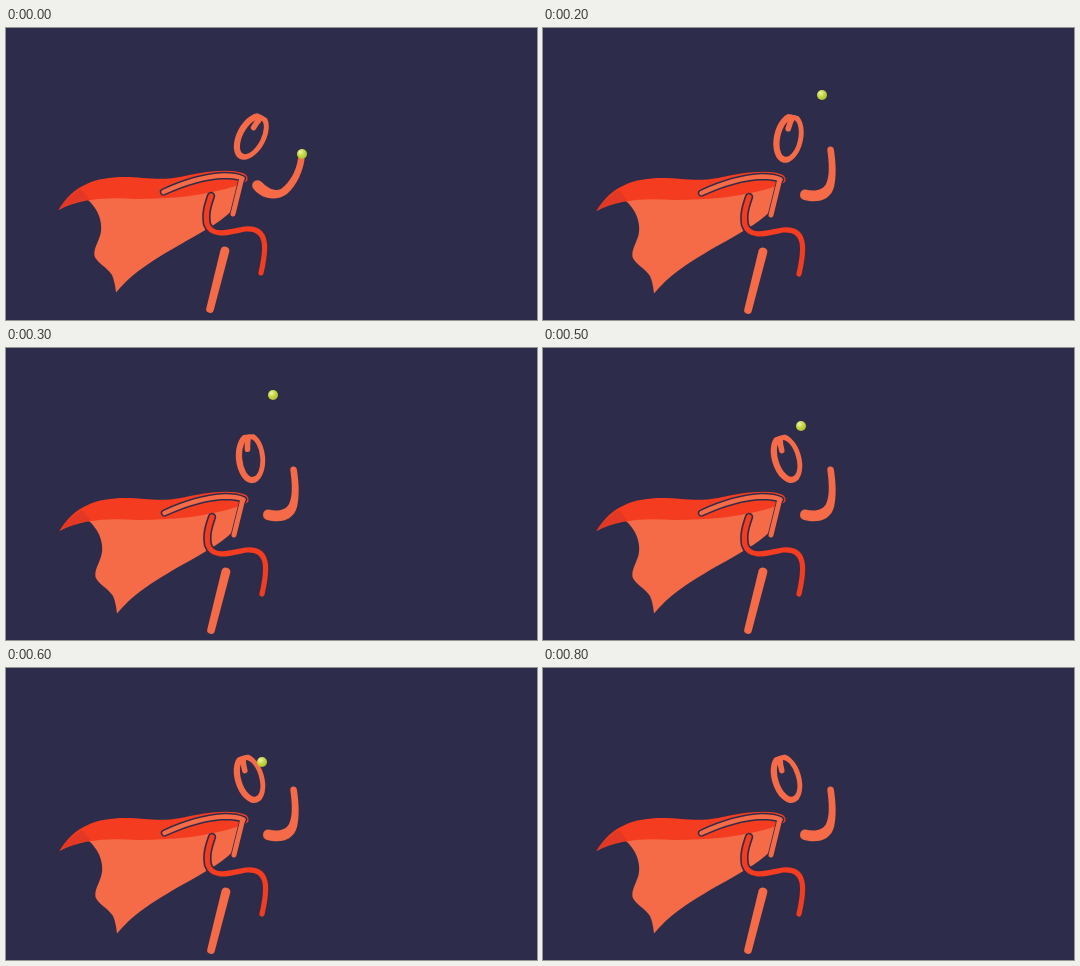
These frames come from a looping animation (531 by 292 pixels, 0.9 s). An HTML page:

```html
<!DOCTYPE html>
<html lang="en">
<head>
<meta charset="utf-8">
<title>Caped ball toss</title>
<style>
  html, body { margin: 0; width: 100%; height: 100%; overflow: hidden; background: #2d2c4a; }
  svg { display: block; width: 100%; height: 100%; }
  .line { fill: none; stroke-linecap: round; stroke-linejoin: round; }
  .skin { fill: #f56a47; }
</style>
</head>
<body>
<svg viewBox="0 0 531 292">
  <defs>
    <radialGradient id="felt" cx=".36" cy=".32" r=".75">
      <stop offset="0" stop-color="#edf2b4"/>
      <stop offset=".5" stop-color="#c5d640"/>
      <stop offset="1" stop-color="#a9bd2e"/>
    </radialGradient>
    <clipPath id="headTop"><rect x="-20" y="-23.500" width="40" height="50"/></clipPath>
    <path id="arm" d="M158.500 165C178 156 197 149.500 219 148.500Q231 148.500 237.500 151.500"/>
    <path id="leg" d="M206 169C203 178 200 186 202 197C207 212 228 204 240 202C263 200 262 220 256 246"/>
  </defs>

  <g id="body">
    <path class="skin" d="M76 162L83 173C94 183 98 196 95.500 207C92.500 217 88.500 222 89.500 229C92 236 102 240 107 248Q110 255 111 265.500C133 238 175 218.500 203 201.500Q218 192.500 227 183.500L240 152L160 156Z"/>
    <path fill="#f43c20" d="M53.500 183C68 158 91 150 119 150C139 150 153 154 175 150C199 145 223 141 239 146.500Q244 149 242 154L234 158C201 169 165 172 131 172C101 170 74 172 53.500 183Z"/>
    <path fill="#e23825" d="M53.500 183Q63 169 76 162L84 172Q66 175 53.500 183Z"/>
    <path class="line" stroke="#2d2c4a" stroke-width="6.600" d="M236.500 153L228 187"/>
    <use href="#arm" class="line" stroke="#2d2c4a" stroke-width="7.400"/>
    <use href="#arm" class="line" stroke="#f56a47" stroke-width="4.600"/>
    <path class="line" stroke="#f56a47" stroke-width="5" d="M236.500 152.500L228 187"/>
    <use href="#leg" class="line" stroke="#2d2c4a" stroke-width="8.400"/>
    <use href="#leg" class="line" stroke="#f43c20" stroke-width="5.200"/>
    <path class="skin" d="M215.600 222.500A4.500 4.500 0 0 1 224.300 224.500L208.800 283A3.800 3.800 0 0 1 201.300 281.200Z"/>
  </g>

  <path id="throwArm" class="skin" d="M292 130.500A3.300 3.300 0 0 1 298.500 131.500C297 143 291 157 281 166C270 174 256 171 248 161.500A5.300 5.300 0 0 1 255 153.500C261 159 267 164 275 161C284 154 290 144 292 130.500Z"/>
  <path id="restArm" class="skin" d="M284.300 122A3.300 3.300 0 0 1 290.800 121C293 134 293.500 149 291 159C288 171 276 176 261 172A5.400 5.400 0 0 1 262.500 161.400C272 164 280 162 283 156C287 148 286 134 284.300 122Z"/>

  <g id="head">
    <g clip-path="url(#headTop)">
      <path class="skin" fill-rule="evenodd" d="M-14.600 0a14.600 25.200 0 1 0 29.200 0a14.600 25.200 0 1 0 -29.200 0ZM-8.300 0a9 19 0 1 0 18 0a9 19 0 1 0 -18 0Z"/>
      <path class="line" stroke="#f56a47" stroke-width="5.600" d="M0 -22Q-2 -16 -2.200 -9"/>
    </g>
  </g>
  <circle id="ball" r="5" fill="url(#felt)"/>
</svg>
<script>
  const STEP = 100;
  const LOOP = 900;
  // Ball x, y; head x, y, tilt
  const restingHead = [243.5, 110.5, -17];
  const poses = [
    { ball: [296, 126], head: [245.3, 108.5, 28] },
    { ball: [290, 95], head: [246.3, 109.5, 28] },
    { ball: [279, 67], head: [245.5, 110, 12] },
    { ball: [267, 47], head: [244.5, 110, -5] },
    { ball: [260, 62], head: restingHead },
    { ball: [258, 78], head: restingHead },
    { ball: [256, 94], head: restingHead },
    { ball: [252, 111], head: restingHead },
    { ball: null, head: restingHead }
  ];

  const part = id => document.getElementById(id);
  const show = (id, visible) =>
    part(id).setAttribute("visibility", visible ? "visible" : "hidden");
  const place = (id, x, y, tilt = 0) =>
    part(id).setAttribute("transform", `translate(${x} ${y}) rotate(${tilt})`);

  function draw(time) {
    const step = Math.floor((time % LOOP) / STEP);
    const { ball, head } = poses[step];
    const throwing = step === 0;
    const shift = throwing ? -1 : 0;

    place("body", shift, shift);
    place("head", ...head);
    show("throwArm", throwing);
    show("restArm", !throwing);
    show("ball", ball !== null);
    if (ball) place("ball", ...ball);
  }

  const start = performance.now();
  function tick() {
    draw(performance.now() - start);
    requestAnimationFrame(tick);
  }
  tick();
</script>
</body>
</html>
```
